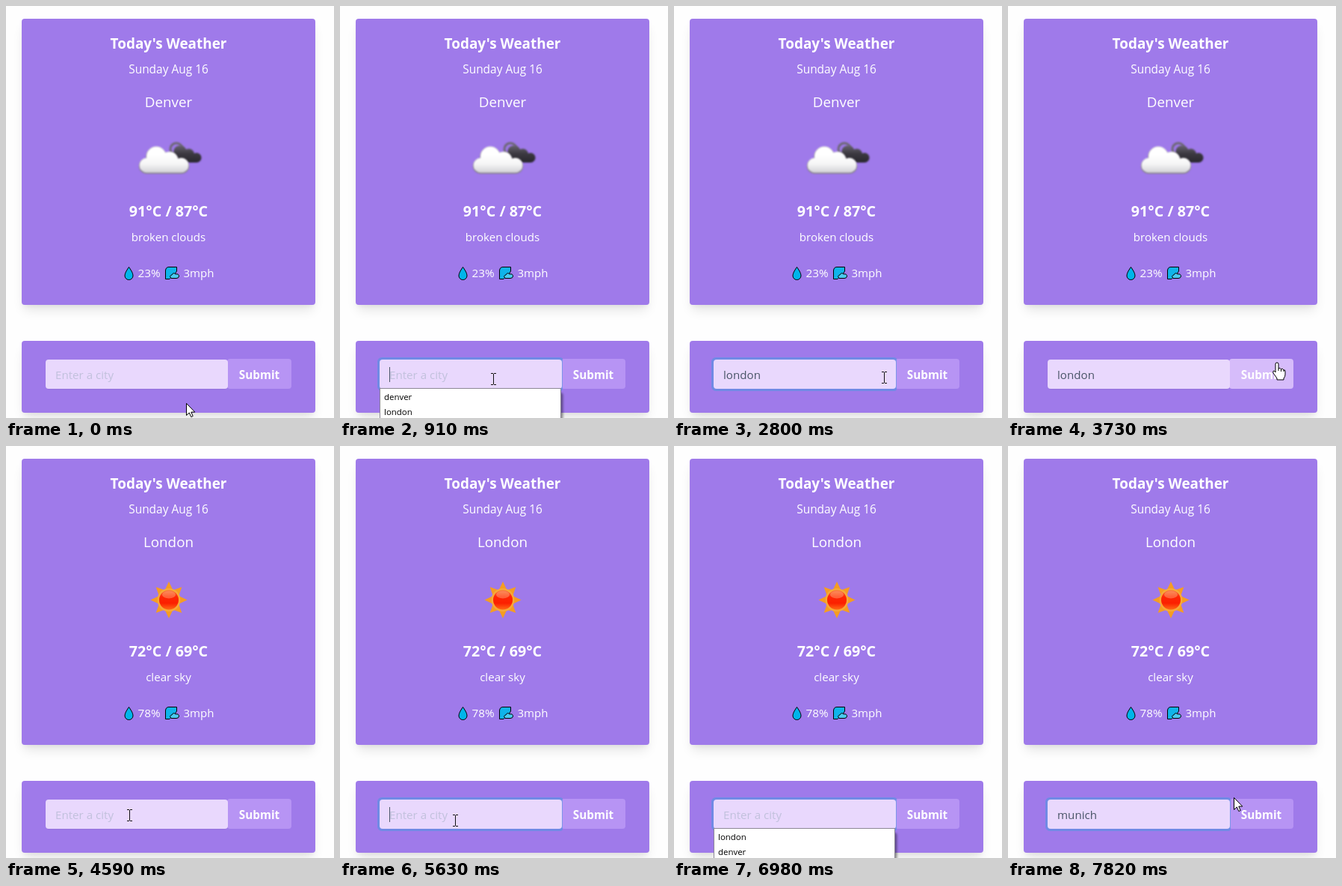
An HTML page with a canvas for the animation above (8000 ms loop, 439 px wide and 550 px high).

```html
<!DOCTYPE html>
<html lang="en">
<head>
<meta charset="utf-8">
<title>Today's Weather</title>
<style>
  html, body { margin: 0; width: 100%; height: 100%; overflow: hidden; background: #fefefe; }
  canvas { display: block; width: 439px; height: 550px; }
</style>
</head>
<body>
<canvas id="stage" width="439" height="550"></canvas>
<script>
const ctx = document.getElementById('stage').getContext('2d');
const LOOP = 8000;
const TICK = 80;
const BLINK = 500;
const FAMILY = '"Open Sans", "Noto Sans", sans-serif';

const INPUT = { x: 53, y: 472, w: 244, h: 39 };
const BUTTON = { x: 296, y: 471, w: 86, h: 40 };
const LIST = { x: 53.5, y: 511, w: 242, row: 20 };

const DENVER = { name: 'Denver', temp: '91°C / 87°C', sky: 'broken clouds', wet: '23%', icon: drawClouds };
const LONDON = { name: 'London', temp: '72°C / 69°C', sky: 'clear sky', wet: '78%', icon: drawSun };

// Each round: focus the field, open the list, pick a city, leave the field, submit
const ROUNDS = [
  { weather: DENVER, cities: ['denver', 'london'], choice: 'london', focus: 830, open: 910, pick: 2260, blur: 3130, end: 4290 },
  { weather: LONDON, cities: ['london', 'denver'], choice: 'munich', focus: 5380, open: 6180, pick: 7310, blur: LOOP, end: LOOP }
];

// Pointer moves: start, end, destination
const MOVES = [
  [210, 450, 205, 498],
  [1240, 2100, 128, 534],
  [2260, 3050, 360, 476],
  [4290, 4590, 165, 493],
  [4910, 5210, 154, 500],
  [5530, 6260, 148, 506],
  [6430, 7040, 140, 560],
  [7500, 7820, 302, 469]
];

const ARROW = new Path2D('M.5 .5V16.5L4.3 13L6.8 18.6L9.2 17.5L6.8 12.1H11.8Z');
const HAND = new Path2D('M-2 13V2Q-2 0 0 0T2 2V8Q4 6 5.5 9Q7.5 7 9 10Q11 9 11 12V16Q11 19 9 21V23H0V21L-5 14Q-6 11-4 11Q-3 11-2 13ZM2 8V11M5.5 9V12M9 10V12');
const DROP = new Path2D('M164.5 348.5Q159 356 159 360A5.5 5.5 0 0 0 170 360Q170 356 164.5 348.5Z');
const HEAD = new Path2D('M213.5 364.5V353Q214 348.5 218 348.5H228.5V354L226.5 357L219 364.5Z');
const PUFF = new Path2D('M221 363.5Q218 360 222 359Q224 355 227 358Q231.5 357 231.5 361Q231 363.5 228 363.5Z');

const inside = (p, r) => p.x >= r.x && p.x < r.x + r.w && p.y >= r.y && p.y < r.y + r.h;
const smooth = k => k * k * (3 - 2 * k);

function pointerAt(t) {
  let x = 241, y = 530;
  for (const [from, to, ex, ey] of MOVES) {
    if (t < from) break;
    const held = Math.floor((t - from) / TICK) * TICK;
    const k = t >= to ? 1 : smooth(held / (to - from));
    x += (ex - x) * k;
    y += (ey - y) * k;
  }
  return { x: Math.round(x), y: Math.round(y) };
}

function stateAt(t) {
  const r = ROUNDS.find(round => t < round.end);
  const picked = t >= r.pick;
  return {
    weather: r.weather,
    focus: t >= r.focus && t < r.blur,
    value: picked ? r.choice : '',
    list: t >= r.open && !picked ? r.cities : null,
    caret: Math.floor((t - (picked ? r.pick : r.focus)) / BLINK) % 2 === 0
  };
}

function box(x, y, w, h, r, fill) {
  ctx.beginPath();
  ctx.roundRect(x, y, w, h, r);
  ctx.fillStyle = fill;
  ctx.fill();
}

function shadow(r, dy, blur, inset, alpha, dx = 0) {
  ctx.save();
  ctx.shadowColor = `rgba(0,0,0,${alpha})`;
  ctx.shadowBlur = blur;
  ctx.shadowOffsetX = dx;
  ctx.shadowOffsetY = dy;
  box(r.x + inset, r.y + inset, r.w - 2 * inset, r.h - 2 * inset, 4, '#000');
  ctx.restore();
}

function text(str, x, y, size, { weight = 400, align = 'center', color = '#fff' } = {}) {
  ctx.font = `${weight} ${size}px ${FAMILY}`;
  ctx.textAlign = align;
  ctx.fillStyle = color;
  ctx.fillText(str, x, y);
}

function shade(y0, y1, ...colors) {
  const g = ctx.createLinearGradient(0, y0, 0, y1);
  colors.forEach((c, i) => g.addColorStop(i / (colors.length - 1), c));
  return g;
}

function outlined(path, fill) {
  ctx.fillStyle = fill;
  ctx.fill(path);
  ctx.strokeStyle = '#000';
  ctx.lineWidth = 1;
  ctx.stroke(path);
}

function card(y, h) {
  const r = { x: 21, y, w: 393, h };
  shadow(r, 10, 15, 3, 0.1);
  shadow(r, 4, 6, 2, 0.05);
  box(r.x, r.y, r.w, r.h, 4, '#9f7aea');
}

// A cloud 67 wide whose flat base starts at x, y
function cloud(x, y, scale, fill) {
  const p = new Path2D();
  const puff = (cx, cy, r) => {
    p.moveTo(cx + r, cy);
    p.arc(cx, cy, r, 0, 7);
  };
  puff(10, -10, 10);
  puff(23, -22, 13.5);
  puff(41, -17, 11.5);
  puff(57, -10, 10);
  p.rect(10, -14, 47, 14);
  ctx.save();
  ctx.translate(x, y);
  ctx.scale(scale, scale);
  ctx.fillStyle = fill;
  ctx.fill(p);
  ctx.restore();
}

function drawClouds() {
  ctx.save();
  ctx.filter = 'blur(0.9px)';
  ctx.strokeStyle = '#6d6874';
  ctx.lineWidth = 3;
  ctx.beginPath();
  ctx.arc(228, 191, 8, 0, 7);
  ctx.stroke();
  cloud(218, 209, 0.65, shade(-36, 0, '#6a6670', '#3b3840', '#29272e'));
  cloud(178, 224, 1, '#857d8f');
  cloud(178.5, 222.5, 0.985, shade(-36, 0, '#fff', '#fff', '#f6f6f6', '#d2d2d6'));
  ctx.restore();
}

function drawSun() {
  ctx.save();
  ctx.translate(218, 205.5);
  ctx.filter = 'blur(0.7px)';
  ctx.fillStyle = '#f59d22';
  for (let i = 0; i < 8; i++) {
    ctx.beginPath();
    ctx.moveTo(0, -24.5);
    ctx.lineTo(5.5, -13);
    ctx.lineTo(-5.5, -13);
    ctx.fill();
    ctx.rotate(Math.PI / 4);
  }
  const disc = (r, fill) => {
    ctx.beginPath();
    ctx.arc(0, 0, r, 0, 7);
    ctx.fillStyle = fill;
    ctx.fill();
  };
  disc(15.5, '#f6a93a');
  disc(13, shade(-13, 13, '#f9713c', '#ff2604', '#fb2000', '#ff6a16'));
  ctx.fillStyle = 'rgba(255,190,140,.4)';
  ctx.beginPath();
  ctx.ellipse(0, -7, 9, 5, 0, 0, 7);
  ctx.fill();
  ctx.restore();
}

function drawWeather(w) {
  card(17, 382);
  text("Today's Weather", 217.5, 57, 18.9, { weight: 700 });
  text('Sunday Aug 16', 217.5, 90, 15.45);
  text(w.name, 217.5, 135, 18.8);
  w.icon();
  text(w.temp, 217.5, 281, 19.7, { weight: 700 });
  text(w.sky, 217.5, 314, 15.1);
  outlined(DROP, '#00b5ea');
  outlined(HEAD, '#10b4ea');
  outlined(PUFF, '#4cc9ee');
  text(w.wet, 176.5, 362, 15.3, { align: 'left' });
  text('3mph', 237.5, 362, 15, { align: 'left' });
}

function drawForm(s, hover) {
  card(447, 96);
  if (!s.focus) {
    shadow(INPUT, 1, 3, 1, 0.1);
    shadow(INPUT, 1, 2, 1, 0.06);
  }
  box(BUTTON.x, BUTTON.y, BUTTON.w, BUTTON.h, 4, hover ? '#d6bcfa' : '#b794f4');
  text('Submit', 339, 498, 15.3, { weight: 700 });
  if (s.focus) {
    ctx.save();
    ctx.beginPath();
    ctx.rect(50, 469, 248, 45);
    ctx.clip();
    box(INPUT.x - 3, INPUT.y - 3, INPUT.w + 6, INPUT.h + 6, 6, 'rgba(66,153,225,.5)');
    ctx.restore();
  }
  box(INPUT.x, INPUT.y, INPUT.w, INPUT.h, 4, '#e9d8fd');
  text(s.value || 'Enter a city', 66, 498, 15.15, { align: 'left', color: s.value ? '#4a5568' : '#c1c1dc' });
  if (s.focus && s.caret) {
    const x = 66 + Math.round(ctx.measureText(s.value).width);
    ctx.fillStyle = '#4a5568';
    ctx.fillRect(x, 482, 1, 20);
  }
}

function drawList(names, p) {
  const { x, y, w, row } = LIST;
  shadow({ x, y: y + 2, w, h: 70 }, 3, 3, 0, 0.4, 3);
  ctx.fillStyle = '#fff';
  ctx.fillRect(x, y, w, 60);
  names.forEach((name, i) => {
    const top = y + i * row;
    if (p.y >= top && p.y < top + row) {
      ctx.fillStyle = '#e9e9e9';
      ctx.fillRect(x, top, w, row);
    }
    text(name, 59, top + 15, 11.45, { align: 'left', color: '#000' });
  });
  ctx.strokeStyle = '#8c8796';
  ctx.lineWidth = 1;
  ctx.strokeRect(x, y - 0.5, w, 64);
}

function drawBeam() {
  ctx.fillStyle = '#111';
  ctx.fillRect(0, -7, 1, 14);
  for (const y of [-8, 7]) {
    ctx.fillRect(-3, y, 3, 1);
    ctx.fillRect(1, y, 3, 1);
  }
}

function drawPointer(p, hover) {
  ctx.save();
  ctx.translate(p.x, p.y);
  if (hover) outlined(HAND, '#fff');
  else if (inside(p, INPUT)) drawBeam();
  else outlined(ARROW, '#fff');
  ctx.restore();
}

function draw(t) {
  const s = stateAt(t);
  const p = pointerAt(t);
  const hover = inside(p, BUTTON) && !inside(p, INPUT);
  ctx.fillStyle = '#fefefe';
  ctx.fillRect(0, 0, 439, 550);
  drawWeather(s.weather);
  drawForm(s, hover);
  if (s.list) drawList(s.list, p);
  drawPointer(p, hover);
}

const begin = performance.now();
function tick() {
  draw((performance.now() - begin) % LOOP);
  requestAnimationFrame(tick);
}
tick();
</script>
</body>
</html>
```
